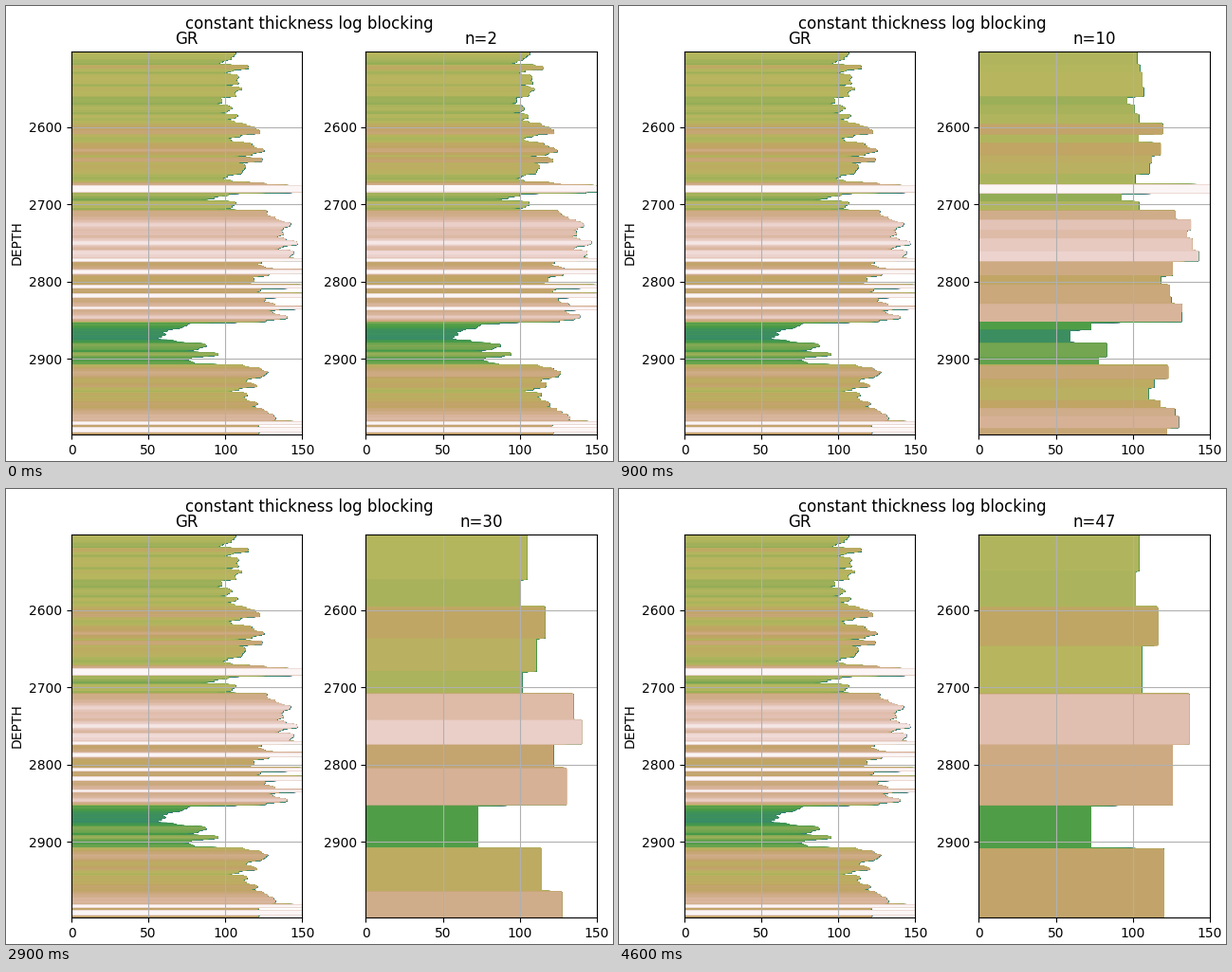
These frames come from a looping animation (640 px wide and 480 px high, 4700 ms). A matplotlib script:

```python
import numpy as np
import matplotlib.pyplot as plt
from matplotlib.animation import FuncAnimation
from matplotlib.collections import PolyCollection

W, H = 640, 480
TOP, BASE, STEP = 2502, 2998, 4
GR_MAX = 150

# Gamma-ray readings every STEP metres
READINGS = [
    104, 105, 103, 97, 93, 115, 103, 98, 107, 106, 107, 98, 108, 106, 105,
    95, 97, 93, 102, 101, 96, 105, 101, 106, 113, 119, 121, 108, 101, 102,
    115, 116, 123, 116, 104, 122, 108, 112, 111, 110, 101, 96, 102, 125, 156,
    156, 100, 92, 83, 105, 103, 93, 126, 126, 130, 134, 142, 137, 135, 136,
    132, 138, 146, 135, 131, 143, 142, 134, 122, 119, 125, 133, 128, 115, 118,
    114, 124, 122, 118, 125, 124, 124, 131, 136, 127, 131, 138, 124, 74, 72,
    61, 59, 57, 55, 68, 87, 82, 70, 93, 77, 73, 78, 112, 121, 126,
    123, 114, 112, 118, 108, 101, 114, 111, 114, 120, 116, 122, 127, 130, 131,
    122, 120, 117, 122, 121,
]
# Thin hot beds: top depth, thickness
HOT_BEDS = [(2771, 2), (2785, 4), (2805, 3), (2816, 4), (2833, 2),
            (2982, 2), (2990, 4)]


def make_log(depth):
    pos = (depth - TOP) / STEP
    node = np.floor(pos)
    ramp = np.clip((pos - node - 0.5) * 2 + 0.5, 0, 1)
    gr = np.interp(node + ramp, np.arange(len(READINGS)), READINGS)
    gr += np.random.default_rng(4).normal(0, 1, depth.size)
    for top, thick in HOT_BEDS:
        gr[(depth >= top) & (depth < top + thick)] = 154
    return gr


def blocks(v, n, start=0):
    """Regression-tree splits with at least n samples per block."""
    m = len(v)
    if m < 2 * n:
        yield slice(start, start + m)
        return
    k = np.arange(n, m - n + 1)
    total = np.cumsum(v)
    left = total[k - 1]
    gain = left ** 2 / k + (total[-1] - left) ** 2 / (m - k)
    cut = k[np.argmax(gain)]
    yield from blocks(v[:cut], n, start)
    yield from blocks(v[cut:], n, start + cut)


def block_log(v, n):
    out = np.empty_like(v)
    for part in blocks(v, n):
        out[part] = np.median(v[part])
    return out


def polygons(curve, level):
    """Areas from zero to the curve wherever it reaches the level."""
    inside = np.concatenate([[0], curve >= level, [0]]).astype(int)
    edges = np.flatnonzero(np.diff(inside))
    polys = []
    for i, j in zip(edges[::2], edges[1::2]):
        x = np.concatenate([[0], curve[i:j], [0]])
        y = np.concatenate([depth[i:i + 1], depth[i:j], depth[j - 1:j]])
        polys.append(np.column_stack([x, y]))
    return polys


def add_track(x, title):
    ax = fig.add_axes([x / W, 28 / H, 243.3 / W, 404 / H])
    ax.set(xlim=(0, GR_MAX), ylim=(BASE, TOP), title=title,
           xticks=range(0, 151, 50), yticks=range(2600, 2901, 100))
    ax.grid(True)
    layers = []
    for level in levels:
        layer = PolyCollection([], color=cmap(level / GR_MAX), linewidths=1)
        ax.add_collection(layer, autolim=False)
        layers.append(layer)
    return ax, layers


def fill_track(layers, curve):
    for layer, level in zip(layers, levels):
        layer.set_verts(polygons(curve, level))


depth = np.arange(TOP, BASE + 1, dtype=float)
gr = make_log(depth)
levels = np.arange(0, GR_MAX, GR_MAX / 100)
cmap = plt.get_cmap("gist_earth")

fig = plt.figure(figsize=(W / 100, H / 100), dpi=100)

# The left track never changes, so render it once and reuse the image
log_ax, log_layers = add_track(69, "GR")
log_ax.set_ylabel("DEPTH")
fill_track(log_layers, gr)
fig.canvas.draw()
still = np.array(fig.canvas.buffer_rgba())[:, :330]
log_ax.remove()
fig.figimage(still, origin="upper")

fig.suptitle("constant thickness log blocking")
block_ax, block_layers = add_track(379.4, "n=2")


def update(i):
    n = max(2, i + 1)
    fill_track(block_layers, block_log(gr, n))
    block_ax.set_title(f"n={n}")
    return []


anim = FuncAnimation(fig, update, frames=47, interval=100,
                     init_func=lambda: [], repeat=True, repeat_delay=0)
plt.show()
```
